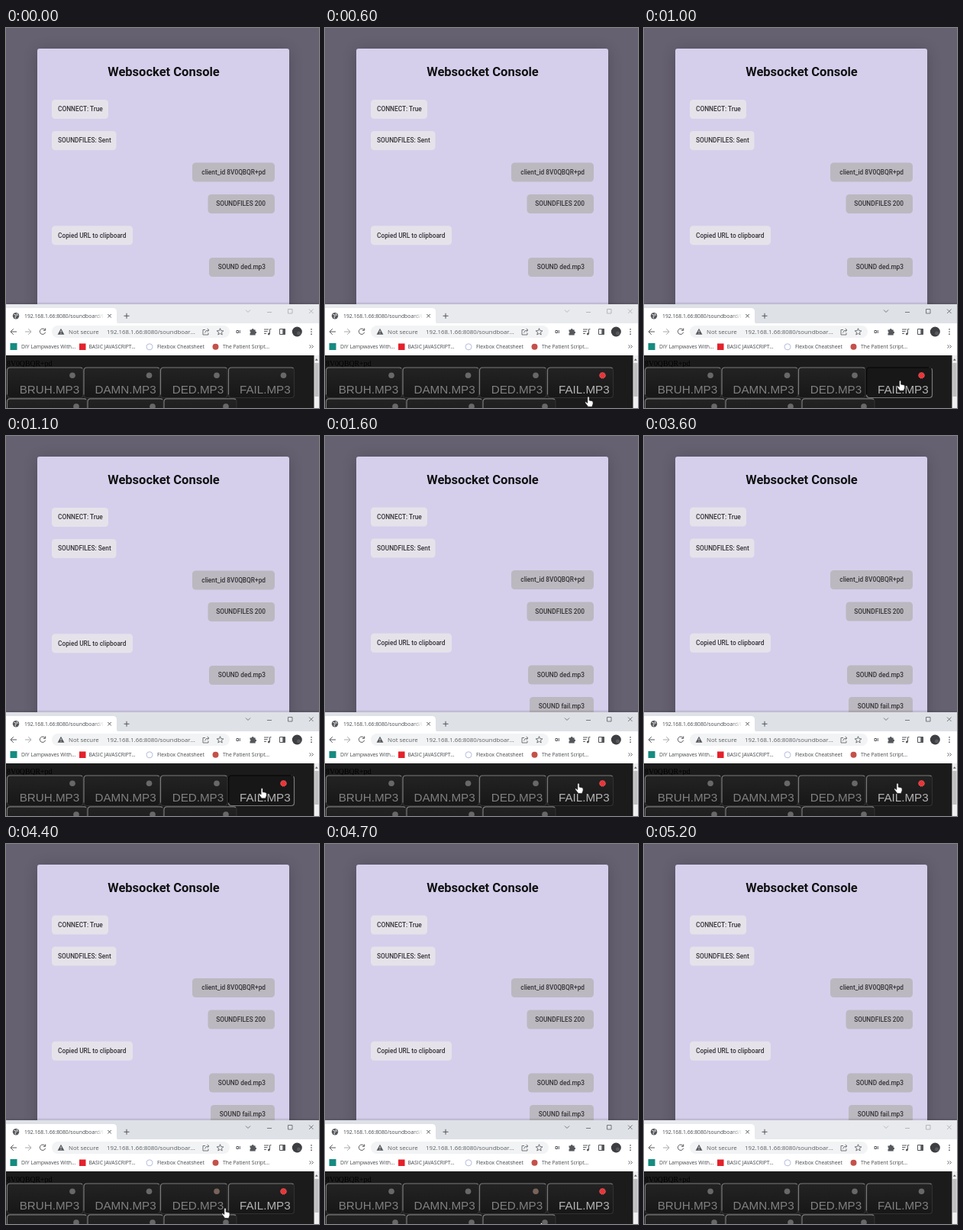
An HTML page for the animation above (5300 ms loop, 410 by 498 pixels).

```html
<!DOCTYPE html>
<html lang="en">
<head>
<meta charset="utf-8">
<title>Websocket Console</title>
<style>
  html, body { margin: 0; width: 100%; height: 100%; overflow: hidden; background: #635e6e; }
  svg { display: block; }
  text { white-space: pre; }
  .title { font: 700 16.5px Roboto, sans-serif; fill: #111; text-anchor: middle; }
  .message { font: 500 8.3px Roboto, sans-serif; fill: #343236; }
  .message .sent { text-anchor: end; }
  .ui { font: 6.8px "Open Sans", sans-serif; fill: #45484c; }
  .url { font-size: 7.85px; fill: #5a5d61; }
  .id { font: 9.8px "Liberation Serif", serif; fill: #000; }
  .sound text { font: 15.2px "Liberation Sans", sans-serif; fill: #808080; text-anchor: end; }
  .sound path { fill: none; stroke-width: 1.2; }
  .sound .key { fill: url(#key); }
  .sound .upper { stroke: #7a7a7a; }
  .sound .lower { stroke: #303030; }
  .sound .led { fill: #686868; }
  .sound.lit text { fill: #b4b4b4; }
  .sound.lit .led { fill: #e9343a; stroke: #ff7770; stroke-width: 1; stroke-dasharray: 1.2 .9; }
  .sound.warm .led { fill: #79635a; }
  .sound.pressed .key { fill: #171717; }
  .sound.pressed .upper { stroke: #050505; }
  .sound.pressed .lower { stroke: #7a7a7a; }
  .line { fill: none; stroke: #54575b; stroke-width: 1; }
  .frame-icons { fill: none; stroke: #5c5f63; stroke-width: .8; }
  .inactive .frame-icons { stroke: #a9acb0; }
  .strip { fill: #dee1e6; }
  .inactive .strip { fill: #e8eaed; }
</style>
</head>
<body>
<svg id="stage" width="410" height="498" viewBox="0 0 410 498">
  <defs>
    <linearGradient id="key" x2="0" y2="1">
      <stop stop-color="#232323"/><stop offset="1" stop-color="#171717"/>
    </linearGradient>
    <linearGradient id="tabFade">
      <stop offset=".86" stop-color="#fff" stop-opacity="0"/><stop offset="1" stop-color="#fff"/>
    </linearGradient>
    <filter id="shadow" x="-20%" y="-20%" width="140%" height="140%">
      <feDropShadow dx="0" dy="2" stdDeviation="10" flood-color="#000" flood-opacity=".22"/>
    </filter>
    <filter id="windowShadow" x="-5%" y="-10%" width="110%" height="120%">
      <feDropShadow dx="0" dy="0" stdDeviation="2.5" flood-color="#000" flood-opacity=".28"/>
    </filter>
  </defs>

  <rect width="410" height="498" fill="#666171"/>
  <rect x="41" y="27" width="330" height="480" rx="3" fill="#d5cfec" filter="url(#shadow)"/>
  <text class="title" x="206.5" y="62.5">Websocket Console</text>
  <g id="messages" class="message"></g>

  <g id="browser">
    <rect class="strip" y="362" width="410" height="26" filter="url(#windowShadow)"/>
    <path d="M0 367h140q5 0 5 5v12q0 4 4 4H0z" fill="#fff"/>
    <rect y="387" width="410" height="42" fill="#fff"/>
    <g class="ui">
      <text x="24" y="379.7">192.168.1.66:8080/soundboard/b</text>
      <rect x="25" y="370" width="104" height="14" fill="url(#tabFade)"/>
      <rect x="127" y="370" width="5" height="14" fill="#fff"/>
      <rect x="60" y="390" width="233" height="16" rx="8" fill="#f1f3f4"/>
      <text class="url" x="82" y="401">Not secure</text>
      <text class="url" x="132" y="401">192.168.1.66:8080/soundboar...</text>
      <text x="20" y="419.8">DIY Lampwaves With...</text>
      <text x="108.5" y="419.8">BASIC JAVASCRIPT...</text>
      <text x="198" y="419.8">Flexbox Cheatsheet</text>
      <text x="284" y="419.8">The Patient Script...</text>
    </g>
    <g class="frame-icons">
      <path d="M314 369.5l3 3 3-3M342 372.5h6M369.5 368.5h5.5v5.5h-5.5zM397 368.5l5.5 5.5m0-5.5l-5.5 5.5"/>
    </g>
    <circle cx="13" cy="377.3" r="4.2" fill="#54575b"/>
    <path d="M10.5 375.5l2 .3 1 1.7-1.5 1 .3 2M14.5 374l-.5 1.5 2 1" fill="none" stroke="#fff" stroke-width=".9"/>
    <path class="line" d="M133.3 375l4.5 4.5m0-4.5l-4.5 4.5M154.5 377.3h7M158 373.8v7"/>
    <path class="line" d="M14 398H6m3.8-3.8L6 398l3.8 3.8"/>
    <path class="line" d="M25 398h8m-3.8-3.8L33 398l-3.8 3.8" style="stroke:#a8aaad"/>
    <path class="line" d="M51 395.5a3.7 3.7 0 1 0 .6 3.2M51.7 393.5v2.8h-2.8"/>
    <path d="M72 393.8l4.4 8h-8.8z" fill="#54575b"/>
    <path d="M72 396.5v2.4m0 1v1" stroke="#fff" stroke-width=".9"/>
    <path class="line" d="M261 395.5h-3v6.5h7v-2.5M260.5 399.5q.5-3.5 5-3.5m-1.8-2.2l2.2 2.2-2.2 2.2" style="stroke-width:.8"/>
    <path class="line" d="M280.5 393.7l1.2 3 3.2.2-2.5 2 .8 3.1-2.7-1.7-2.7 1.7.8-3.1-2.5-2 3.2-.2z" style="stroke-width:.8"/>
    <path class="line" d="M302 396.5h2.5v3H302zM306.3 396v4"/>
    <path d="M319.5 395.5h2.2a1.5 1.5 0 0 1 3 0h2v2.2a1.4 1.4 0 0 1 0 2.8v2h-7.2v-2.3a1.4 1.4 0 0 0 0-2.6z" fill="#54575b"/>
    <path class="line" d="M338 395h6M338 397.7h4.5M338 400.4h3M345.5 401v-6.3h2"/>
    <circle cx="344.3" cy="401" r="1.4" fill="#54575b"/>
    <path class="line" d="M358.5 394.5h7v7h-7z"/>
    <path d="M362.3 394.5h3.2v7h-3.2z" fill="#54575b"/>
    <circle cx="381.3" cy="398" r="6.5" fill="#3d3e41"/>
    <circle cx="383.5" cy="400" r="2.5" fill="#57595c"/>
    <path d="M400 394.8v.01M400 398v.01M400 401.2v.01" stroke="#54575b" stroke-width="1.7" stroke-linecap="round"/>
    <rect x="5.5" y="413" width="9" height="9" fill="#168b80"/>
    <rect x="96" y="413.5" width="8.5" height="8.5" fill="#e3222b"/>
    <circle cx="188" cy="417.8" r="4" fill="none" stroke="#b5bce0" stroke-width="1"/>
    <circle cx="274.5" cy="417.8" r="4" fill="#c4514a"/>
    <path class="line" d="M397.5 415.5l2 2-2 2m3-4l2 2-2 2" style="stroke-width:.9"/>

    <rect y="429" width="410" height="69" fill="#1b1b1b"/>
    <text class="id" x="1" y="443">8V0QBQR+pd</text>
    <g id="sounds"></g>
    <rect x="403.5" y="429" width="6.5" height="69" fill="#f0f0f0"/>
    <rect x="404.3" y="439" width="5.2" height="44" fill="#bfbfbf"/>
    <path d="M404.8 435.8l2-2.6 2 2.6z" fill="#666"/>
  </g>

  <path id="cursor" fill="#fff" stroke="#111" stroke-width=".7" stroke-linejoin="round"
    d="M-1.2 1.2a1.2 1.2 0 0 1 2.4 0v3.9q3.4.2 4.9 1.5v3.2L4.7 13.4h-5L-4 8.4q-.9-1.8.7-1.7l2.1 1.7z"/>
</svg>

<script>
const LOOP = 5300;
const $ = id => document.getElementById(id);

// [text, x, y, width, sent by the client]
const messages = [
  ["CONNECT: True", 60, 94, 74],
  ["SOUNDFILES: Sent", 60, 135, 84.5],
  ["client_id 8V0QBQR+pd", 244, 176.5, 108, true],
  ["SOUNDFILES 200", 264.5, 218, 87.5, true],
  ["Copied URL to clipboard", 60, 259.3, 106],
  ["SOUND ded.mp3", 266, 301, 86, true],
  ["SOUND fail.mp3", 268, 342.5, 84, true],
];
$("messages").innerHTML = messages.map(([text, x, y, width, sent]) => `<g>
  <rect x="${x}" y="${y}" width="${width}" height="25" rx="4.5" fill="${sent ? "#bcb8bf" : "#e6e2ea"}"/>
  <text class="${sent ? "sent" : ""}" x="${sent ? 340 : 68}" y="${y + 15.3}">${text}</text></g>`).join("");

// [label, left, right, top]
const sounds = [
  ["BRUH.MP3", 1.5, 101, 445],
  ["DAMN.MP3", 102, 201.5, 445],
  ["DED.MP3", 202.5, 290, 445],
  ["FAIL.MP3", 291.5, 377.5, 445],
  ["", 1.5, 106, 485.8],
  ["", 107, 206, 485.8],
  ["", 207, 302, 485.8],
];
// The bevel is two strokes: top and left, then right and bottom.
$("sounds").innerHTML = sounds.map(([label, left, right, top]) => {
  const width = right - left, height = 39.5;
  return `<g class="sound">
    <rect class="key" x="${left}" y="${top}" width="${width}" height="${height}" rx="4.5"/>
    <path class="lower" d="M${right - 4} ${top}q4 0 4 4v${height - 8}q0 4-4 4h${8 - width}q-4 0-4-4"/>
    <path class="upper" d="M${left} ${top + height - 4}v${8 - height}q0-4 4-4h${width - 8}q2 0 3 1"/>
    <circle class="led" cx="${right - 14}" cy="${top + 10.3}" r="3.8"/>
    <text x="${right - 4.8}" y="${top + 34.3}">${label}</text></g>`;
}).join("");

const newest = $("messages").lastElementChild;
const ded = $("sounds").children[2];
const fail = $("sounds").children[3];

// [time, x, y] of the finger tip
const path = [
  [100, 395, 496], [600, 345, 483], [1000, 335.5, 462], [1200, 335, 461],
  [1600, 332, 455], [3900, 332, 455], [4400, 287, 477], [4800, 283, 500],
];

function cursorAt(t) {
  const i = path.findIndex(key => key[0] > t);
  if (i < 1) return null;
  const [t0, x0, y0] = path[i - 1], [t1, x1, y1] = path[i];
  const k = (t - t0) / (t1 - t0), ease = k * k * (3 - 2 * k);
  return [x0 + (x1 - x0) * ease, y0 + (y1 - y0) * ease];
}

function draw(now) {
  const t = Math.floor(now % LOOP / 100) * 100;
  const during = (from, to) => t >= from && t < to;

  const tip = cursorAt(t);
  $("cursor").style.display = tip ? "" : "none";
  if (tip) $("cursor").setAttribute("transform", `translate(${tip})`);

  const received = t >= 1400;
  newest.style.display = received ? "" : "none";
  $("messages").setAttribute("transform", `translate(0 ${received ? -0.5 : 0})`);

  $("browser").classList.toggle("inactive", !during(900, 5200));
  fail.classList.toggle("lit", during(600, 5000));
  fail.classList.toggle("pressed", during(900, 1200));
  ded.classList.toggle("warm", during(4300, 4800));
  requestAnimationFrame(draw);
}
requestAnimationFrame(draw);
</script>
</body>
</html>
```
